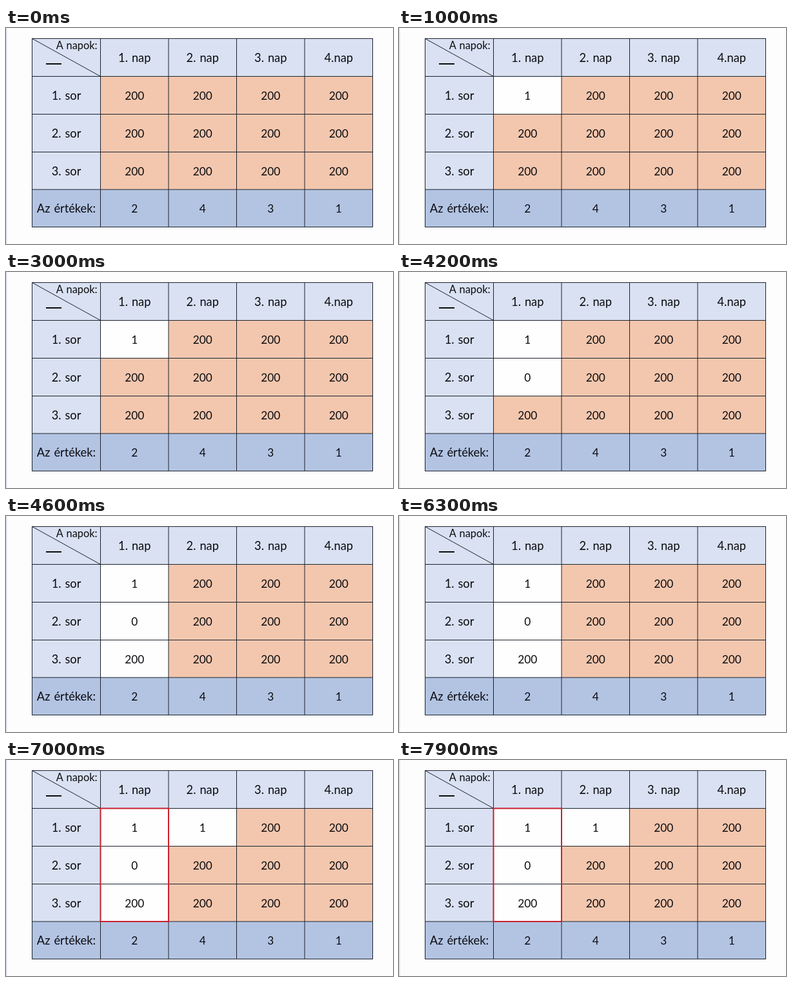
An HTML page for the animation above (8 s loop, 600 by 337 pixels).

```html
<!DOCTYPE html>
<html lang="hu">
<head>
<meta charset="utf-8">
<style>
html, body { margin: 0; width: 100%; height: 100%; overflow: hidden; background: #fdfdfe; }
svg { display: block; width: 600px; height: 337px; }
text { font-family: Lato, Carlito, sans-serif; font-size: 18.3px; word-spacing: 1.2px; text-anchor: middle; fill: #0c0c10; }
.num { font-size: 17.3px; }
.corner { font-size: 16.3px; text-anchor: end; }
.line { fill: none; stroke: #1c222c; stroke-width: 1; }
</style>
</head>
<body>
<svg id="stage" viewBox="0 0 600 337"></svg>
<script>
const LOOP = 8000, BOX_AT = 6600;
const LIGHT = '#d9e1f2', BLUE = '#b3c4e3', ORANGE = '#f3c7ae', WHITE = '#fefefe';
const xs = [40.5, 146.5, 252, 357.5, 463, 568.5];
const ys = [16.5, 75.5, 134.5, 193.5, 252, 310.5];
const rows = [
  ['', '1. nap', '2. nap', '3. nap', '4.nap'],
  ['1. sor', 200, 200, 200, 200],
  ['2. sor', 200, 200, 200, 200],
  ['3. sor', 200, 200, 200, 200],
  ['Az értékek:', 2, 4, 3, 1]
];
const reveals = [
  { at: 500, row: 1, col: 1, value: 1 },
  { at: 3400, row: 2, col: 1, value: 0 },
  { at: 4400, row: 3, col: 1, value: 200 },
  { at: 6700, row: 1, col: 2, value: 1 }
];
const stage = document.getElementById('stage');

function add(tag, attrs, content = '') {
  const el = document.createElementNS('http://www.w3.org/2000/svg', tag);
  for (const key in attrs) el.setAttribute(key, attrs[key]);
  el.textContent = content;
  return stage.appendChild(el);
}

function baseFill(row, col) {
  return row === 4 ? BLUE : row === 0 || col === 0 ? LIGHT : ORANGE;
}

add('rect', { width: 1.5, height: 337, fill: '#dddbe5' });

const cells = rows.map((row, r) => row.map((value, c) => ({
  rect: add('rect', {
    x: xs[c], y: ys[r], width: xs[c + 1] - xs[c], height: ys[r + 1] - ys[r], fill: baseFill(r, c)
  }),
  text: add('text', {
    x: (xs[c] + xs[c + 1]) / 2, y: (ys[r] + ys[r + 1]) / 2 + 6.8,
    class: typeof value === 'number' ? 'num' : ''
  }, value)
})));

const grid = xs.map(x => `M${x} 16V311`).join('') + ys.map(y => `M40 ${y}H569`).join('');
add('path', { class: 'line', d: grid });
add('path', { class: 'line', d: 'M40.5 16.5L146.5 75.5' });
add('path', { d: 'M62 56H86', stroke: '#0c0c10', 'stroke-width': 2 });
add('text', { class: 'corner', x: 141.5, y: 32.5 }, 'A napok:');
const box = add('rect', {
  x: 146.5, y: 75.5, width: 105.5, height: 176.5, fill: 'none', stroke: '#c9202c', 'stroke-width': 2
});

function draw(now) {
  const t = now % LOOP;
  for (const { at, row, col, value } of reveals) {
    const cell = cells[row][col], shown = t >= at;
    cell.rect.setAttribute('fill', shown ? WHITE : ORANGE);
    cell.text.textContent = shown ? value : 200;
  }
  box.setAttribute('visibility', t >= BOX_AT ? 'visible' : 'hidden');
}

const start = performance.now();
function tick() {
  draw(performance.now() - start);
  requestAnimationFrame(tick);
}
tick();
</script>
</body>
</html>
```
